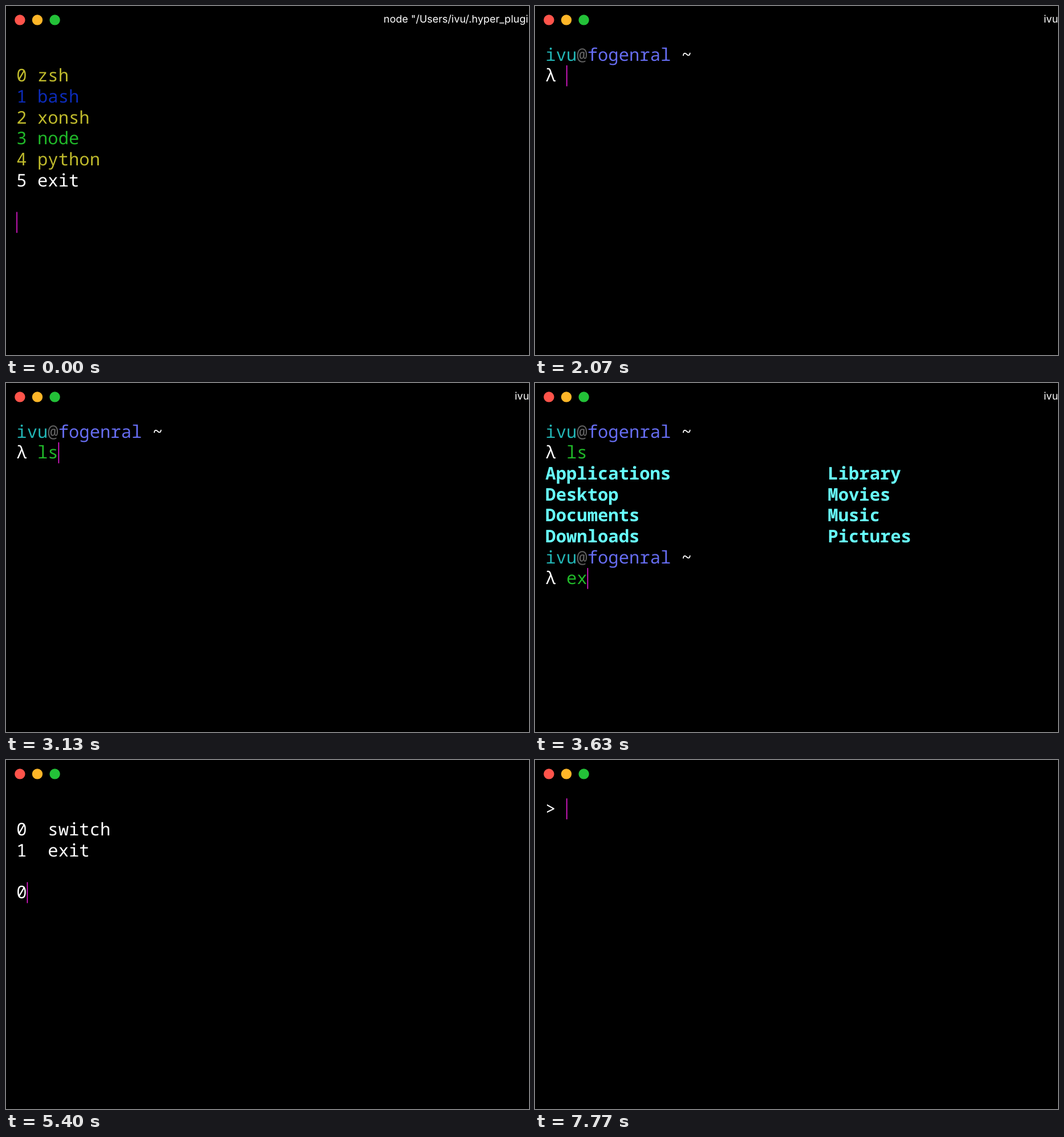
Write an HTML page that moves like this. It is 917 by 611 pixels and loops after 8 s.

```html
<!DOCTYPE html>
<html lang="en">
<head>
<meta charset="utf-8">
<title>Shell switcher</title>
<style>
  html, body { margin: 0; width: 100%; height: 100%; overflow: hidden; background: #000; }
  svg { display: block; width: 917px; height: 611px; }
  text { white-space: pre; text-rendering: geometricPrecision; }
  #screen { font: 30.56px "Noto Sans Mono", "DejaVu Sans Mono", monospace; }
  #title { font: 18px Inter, "Open Sans", sans-serif; fill: #fff; }
</style>
</head>
<body>
<svg viewBox="0 0 917 611">
  <circle cx="24.4" cy="24.4" r="9.2" fill="#ff544b"/>
  <circle cx="55" cy="24.4" r="9.2" fill="#feb628"/>
  <circle cx="85.6" cy="24.4" r="9.2" fill="#23c138"/>
  <text id="title" y="29"></text>
  <g id="screen"></g>
</svg>
<script>
const LOOP = 8000, CELL = 18.333, ROW = 36.667, LEFT = 18.33, TOP = 67.2;
const USER = "ivu", HOST = "fogenral";
const WHITE = "#fff", YELLOW = "#bfba2c", BLUE = "#0c2bb8", GREEN = "#20b829",
      CYAN = "#22b5b5", GRAY = "#606060", VIOLET = "#666df2", BRIGHT = "#67ffff", PINK = "#f81ce5";

const put = (col, row, str, color = WHITE, weight = 400) =>
  `<text x="${LEFT + col * CELL}" y="${TOP + 28.6 + row * ROW}" fill="${color}" font-weight="${weight}">${str}</text>`;

const cursor = (col, row) =>
  `<rect x="${LEFT + col * CELL}" y="${TOP + row * ROW}" width="1.5" height="${ROW}" fill="${PINK}"/>`;

const input = (col, row, str, color) => put(col, row, str, color) + cursor(col + str.length, row);

const prompt = row =>
  put(0, row, USER, CYAN) + put(3, row, "@", GRAY) + put(4, row, HOST, VIOLET) +
  put(13, row, "~") + put(0, row + 1, "λ");

const shells = [["zsh", YELLOW], ["bash", BLUE], ["xonsh", YELLOW],
                ["node", GREEN], ["python", YELLOW], ["exit", WHITE]];
const shellMenu = typed =>
  shells.map(([name, color], i) => put(0, i + 1, i, color) + put(2, i + 1, name, color)).join("") +
  input(0, 8, typed);

const exitMenu = typed =>
  ["switch", "exit"].map((name, i) => put(0, i + 1, i) + put(3, i + 1, name)).join("") +
  input(0, 4, typed);

const folders = ["Applications", "Desktop", "Documents", "Downloads",
                 "Library", "Movies", "Music", "Pictures"];
const listing = folders.map((name, i) => put(i < 4 ? 0 : 27, 2 + i % 4, name, BRIGHT, 700)).join("");

const first = typed => prompt(0) + input(2, 1, typed, GREEN);
const second = typed => prompt(0) + put(2, 1, "ls", GREEN) + listing + prompt(6) + input(2, 7, typed, GREEN);

const launch = [662, `node "/Users/${USER}/.hyper_plugi`], home = [892, USER], none = [0, ""];

// start time, title, screen content
const scenes = [
  [0, launch, shellMenu("")],
  [1500, launch, shellMenu("0")],
  [1770, launch, ""],
  [2070, home, first("")],
  [2730, home, first("l")],
  [2900, home, first("ls")],
  [3200, home, second("")],
  [3500, home, second("e")],
  [3600, home, second("ex")],
  [3730, home, second("exi")],
  [3870, home, second("exit")],
  [4400, none, exitMenu("")],
  [5400, none, exitMenu("0")],
  [5600, none, shellMenu("")],
  [6770, none, shellMenu("3")],
  [7200, none, put(0, 0, "&gt;") + cursor(2, 0)]
];

const title = document.getElementById("title"), screen = document.getElementById("screen");
const start = performance.now();
let shown;

function draw(now) {
  const t = Math.max(0, now - start) % LOOP;
  const scene = scenes.findLast(s => s[0] <= t);
  if (scene !== shown) {
    shown = scene;
    const [, [x, label], content] = scene;
    title.setAttribute("x", x);
    title.textContent = label;
    screen.innerHTML = content;
  }
  requestAnimationFrame(draw);
}
draw(start);
</script>
</body>
</html>
```
